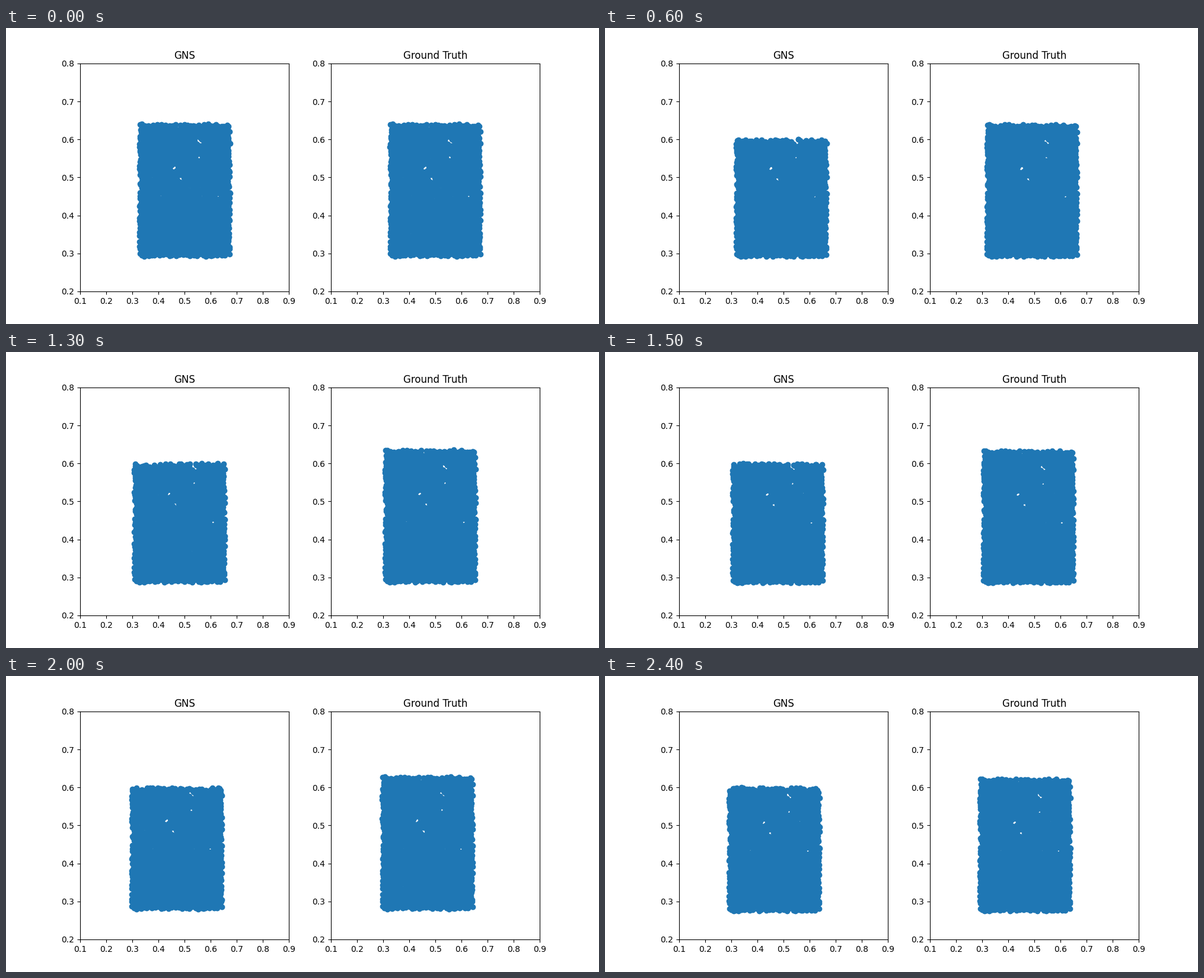
These frames come from a looping animation (1000x500 px, 2.5 s). A matplotlib script:

```python
import numpy as np
import matplotlib.pyplot as plt
from matplotlib.animation import FuncAnimation

FRAMES = 25
LOW, HIGH = np.array([0.326, 0.292]), np.array([0.674, 0.641])
COLS, ROWS = 35, 50
DRIFT = -0.0149                   # x speed, units per second
GRAVITY = -0.0062                 # y acceleration, units per second squared
CEILING = 0.6                     # rollout particles above this are lost
ROLLOUT_START = 6

# The clearest openings between particles, and the room kept around them
GAPS = [(0.550, 0.599), (0.561, 0.592), (0.555, 0.554), (0.628, 0.451),
        (0.457, 0.524), (0.484, 0.498), (0.678, 0.611)]
CLEAR = 0.0135


def make_particles():
    """One particle at random in each cell of a grid, kept off the gaps."""
    rng = np.random.default_rng(4)
    cells = np.stack(np.meshgrid(np.arange(COLS), np.arange(ROWS)), axis=-1)
    spots = cells.reshape(-1, 2) + rng.random((COLS * ROWS, 2))
    pts = LOW + (HIGH - LOW) * spots / (COLS, ROWS)

    # The axes are scaled differently, so gaps are round only on screen
    scale = np.array([1, 641.67 / 440.34])
    for gap in GAPS:
        away = (pts - gap) * scale
        dist = np.linalg.norm(away, axis=1, keepdims=True)
        pts = np.where(dist < CLEAR, gap + away / dist * CLEAR / scale, pts)
    return pts


particles = make_particles()
fig, axes = plt.subplots(1, 2, figsize=(10, 5), dpi=100)
clouds = []
for ax, title in zip(axes, ("GNS", "Ground Truth")):
    ax.set(xlim=(0.1, 0.9), ylim=(0.2, 0.8), title=title)
    ax.set_xticks(np.arange(1, 10) / 10)
    ax.set_yticks(np.arange(2, 9) / 10)
    clouds.append(ax.scatter(particles[:, 0], particles[:, 1], color="C0"))


def update(i):
    t = i / 10
    pts = particles + (DRIFT * t, GRAVITY * t ** 2 / 2)
    kept = pts[pts[:, 1] < CEILING] if i >= ROLLOUT_START else pts
    clouds[0].set_offsets(kept)
    clouds[1].set_offsets(pts)
    return clouds


anim = FuncAnimation(fig, update, frames=FRAMES, interval=100,
                     init_func=lambda: update(0), repeat=True, repeat_delay=0)
plt.show()
```
